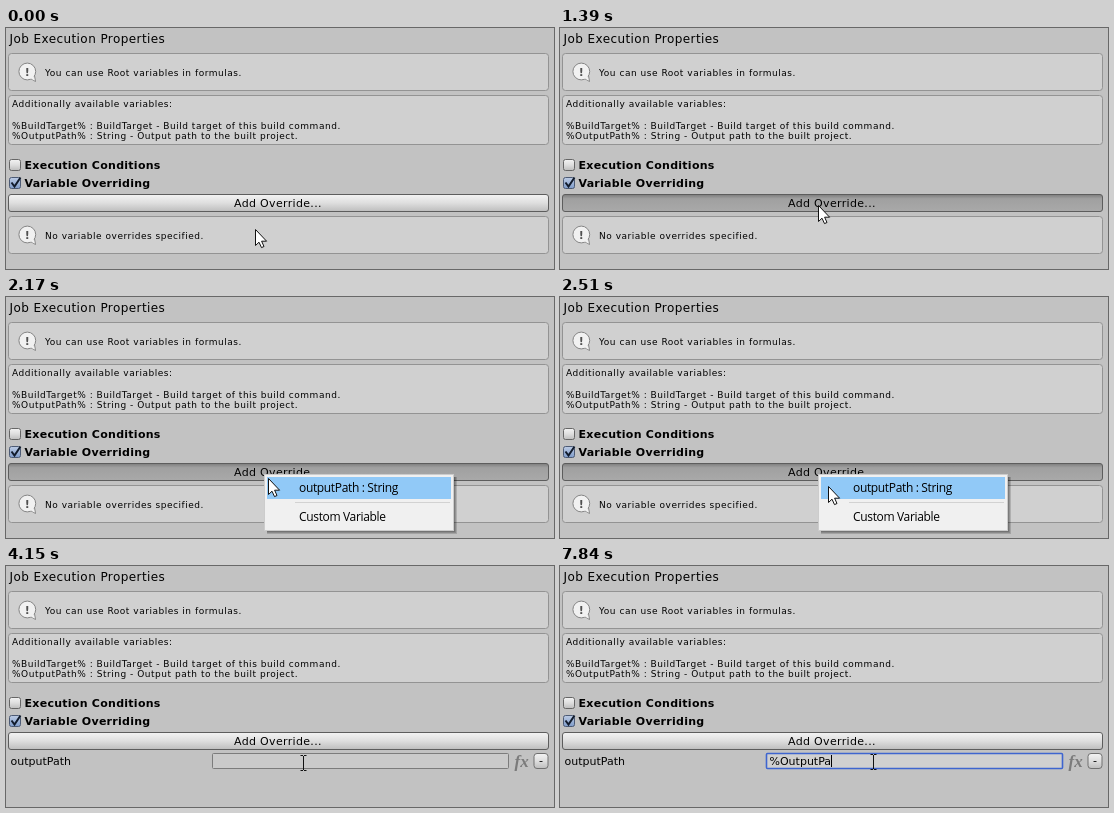
Recreate the animation shown at these times as an HTML page. Size 548 by 241 pixels, loop 8000 ms.

```html
<!DOCTYPE html>
<html lang="en">
<head>
<meta charset="utf-8">
<title>Job Execution Properties</title>
<style>
  html, body { margin: 0; width: 100%; height: 100%; overflow: hidden; background: #c2c2c2; }
  svg { display: block; width: 548px; height: 241px; }
  text { font-family: "DejaVu Sans", sans-serif; font-size: 11px; fill: #000; white-space: pre; }
  .title { font-size: 12px; letter-spacing: .42px; }
  .small { font-size: 9px; letter-spacing: .52px; }
  .bold { font-weight: bold; letter-spacing: .27px; }
  .wide { letter-spacing: .33px; }
  .item { font: 12px "Open Sans", sans-serif; letter-spacing: -.34px; }
  .fx { font: italic bold 17px "Liberation Serif", serif; fill: #7b7b7b; }
  .mark { font-weight: bold; fill: #505050; }
  .box { fill: #d0d0d0; stroke: #939393; }
</style>
</head>
<body>
<svg viewBox="0 0 548 241">
  <defs>
    <linearGradient id="up" x2="0" y2="1">
      <stop offset="0" stop-color="#f3f3f3"/><stop offset=".5" stop-color="#dedede"/><stop offset="1" stop-color="#bdbdbd"/>
    </linearGradient>
    <linearGradient id="down" x2="0" y2="1">
      <stop offset="0" stop-color="#7d7d7d"/><stop offset=".25" stop-color="#a0a0a0"/><stop offset="1" stop-color="#a9a9a9"/>
    </linearGradient>
    <linearGradient id="blue" x2="0" y2="1">
      <stop offset="0" stop-color="#bccbe4"/><stop offset="1" stop-color="#7f9cca"/>
    </linearGradient>
    <g id="bubble">
      <path d="M24.5 6.5 29.5 9.5 28.5 3.5Z" fill="#f1f1f1" stroke="#858585"/>
      <circle cx="21.3" cy="-.5" r="8.4" fill="#f1f1f1" stroke="#858585"/>
      <path d="M24 6 28.5 8.5 27.5 3.5Z" fill="#f1f1f1"/>
      <text class="mark" x="21.3" y="3.5" text-anchor="middle">!</text>
    </g>
  </defs>

  <rect width="548" height="241" fill="#c2c2c2"/>
  <text class="title" x="3.5" y="15">Job Execution Properties</text>

  <rect class="box" x="2.5" y="25.5" width="540" height="37" rx="3"/>
  <use href="#bubble" y="44"/>
  <text class="small" x="39" y="48">You can use Root variables in formulas.</text>

  <rect class="box" x="2.5" y="67.5" width="540" height="49" rx="3"/>
  <text class="small" x="6" y="79">Additionally available variables:</text>
  <text class="small" x="6" y="101">%BuildTarget% : BuildTarget - Build target of this build command.</text>
  <text class="small" x="6" y="111">%OutputPath% : String - Output path to the built project.</text>

  <rect x="3.5" y="131.5" width="11" height="11" rx="2" fill="url(#up)" stroke="#666"/>
  <text class="bold" x="18.5" y="141">Execution Conditions</text>
  <rect x="3.5" y="149.5" width="11" height="11" rx="2" fill="url(#blue)" stroke="#4c5a74"/>
  <path d="M5.5 154.5 8.5 158.5 14.5 149.5" fill="none" stroke="#111b2c" stroke-width="2"/>
  <text class="bold" x="18.5" y="159">Variable Overriding</text>

  <rect id="button" x="2.5" y="166.5" width="540" height="17" rx="2.5" stroke="#5d5d5d"/>
  <text class="wide" x="228" y="179">Add Override...</text>

  <g id="empty">
    <rect class="box" x="2.5" y="188.5" width="540" height="37" rx="3"/>
    <use href="#bubble" y="207"/>
    <text class="small" x="39" y="211">No variable overrides specified.</text>
  </g>

  <g id="row">
    <text x="4.5" y="199">outputPath</text>
    <rect id="field" x="206.5" y="187.5" width="296" height="15" rx="1"/>
    <text id="value" x="209.5" y="199"></text>
    <rect id="caret" y="189" width="1" height="12"/>
    <text class="fx" x="508.5" y="200.5">fx</text>
    <rect x="528" y="187.5" width="14" height="15" rx="3" fill="url(#up)" stroke="#707070"/>
    <path d="M533.5 195.5h3" stroke="#222"/>
  </g>

  <g id="menu">
    <g fill-opacity=".16">
      <rect x="261" y="180" width="190" height="57"/>
      <rect x="261" y="180" width="189" height="56"/>
      <rect x="261" y="180" width="188" height="55"/>
    </g>
    <rect x="258.5" y="177.5" width="189" height="56" fill="#f0f0f0" stroke="#ccc"/>
    <rect id="hover" x="261" y="180" width="184" height="22" fill="#91c9f7"/>
    <path d="M289 205.5h155" stroke="#d2d2d2"/>
    <text class="item" x="293" y="195">outputPath : String</text>
    <text class="item" x="293" y="224">Custom Variable</text>
  </g>

  <svg id="chosen" x="261" y="183" width="184" height="15" viewBox="261 183 184 15" style="width:184px;height:15px">
    <rect x="261" y="183" width="184" height="15" fill="#91c9f7"/>
    <text class="item" x="293" y="195">outputPath : String</text>
  </svg>

  <path id="arrow" d="M.5.5V16.5L4 13.2 6.5 18.6 9 17.5 6.6 12.2H11.6Z" fill="#fff" stroke="#111"/>
  <path id="beam" d="M-3-7.5h2.5M.5-7.5H3M-3 7.5h2.5M.5 7.5H3M0-7V7" fill="none" stroke="#111"/>
</svg>
<script>
const LOOP = 8000;
const $ = id => document.getElementById(id);
const [button, empty, row, field, value, caret, menu, hover, chosen, arrow, beam] =
  ["button", "empty", "row", "field", "value", "caret", "menu", "hover", "chosen", "arrow", "beam"].map($);

// [time, x, y]
const arrowPath = [
  [340, 249, 201], [360, 250, 202], [520, 250, 202], [900, 255, 190], [1180, 258, 177],
  [1970, 258, 177], [2250, 263, 182], [2510, 268, 189]
];
const beamPath = [
  [3830, 270, 191], [3960, 278, 193], [4150, 297, 197], [4240, 307, 199], [4320, 313, 196]
];
const keyTimes = [5820, 6280, 6480, 6630, 6730, 6930, 6980, 7680, 7840];
const typed = "%OutputPa";

const ramp = (t, from, to) => Math.min(1, Math.max(0, (t - from) / (to - from)));

function along(path, t) {
  let [, x, y] = path[0];
  for (let i = 1; i < path.length; i++) {
    const [t0, x0, y0] = path[i - 1], [t1, x1, y1] = path[i];
    if (t < t0) break;
    const k = ramp(t, t0, t1);
    x = x0 + (x1 - x0) * k;
    y = y0 + (y1 - y0) * k;
  }
  return [Math.round(x), Math.round(y)];
}

const show = (el, on) => el.setAttribute("visibility", on ? "visible" : "hidden");
const place = (el, x, y) => el.setAttribute("transform", `translate(${x} ${y})`);

function draw(t) {
  const added = t >= 2960;
  const focused = t >= 4480;
  const clicking = focused && t < 4640;

  button.setAttribute("fill", t >= 1390 && t < 2960 ? "url(#down)" : "url(#up)");
  show(empty, !added);
  show(row, added);

  field.setAttribute("fill", focused ? "#d0d0d0" : "#cacaca");
  field.setAttribute("stroke", focused ? "#3e65cf" : "#7c7c7c");
  field.setAttribute("stroke-width", focused ? 1.6 : 1);
  value.textContent = typed.slice(0, keyTimes.filter(k => t >= k).length);
  caret.setAttribute("x", Math.round(209.5 + value.getComputedTextLength()));
  show(caret, focused);

  const [ax, ay] = clicking ? [313, 195] : along(arrowPath, t);
  place(arrow, ax, ay);
  show(arrow, t < 3000 || clicking);

  const menuOpen = t >= 1570 && t < 2920;
  menu.setAttribute("opacity", menuOpen ? ramp(t, 1520, 1710) : 0);
  show(hover, ay >= 180 && t > 1970);
  chosen.setAttribute("opacity", t >= 2920 ? 0.7 * (1 - ramp(t, 3105, 3320)) : 0);

  const [bx, by] = along(beamPath, t);
  place(beam, bx + .5, by);
  show(beam, t >= 3550 && !clicking);
}

const start = performance.now();
function tick(now) {
  draw(Math.max(0, now - start) % LOOP);
  requestAnimationFrame(tick);
}
draw(0);
requestAnimationFrame(tick);
</script>
</body>
</html>
```
